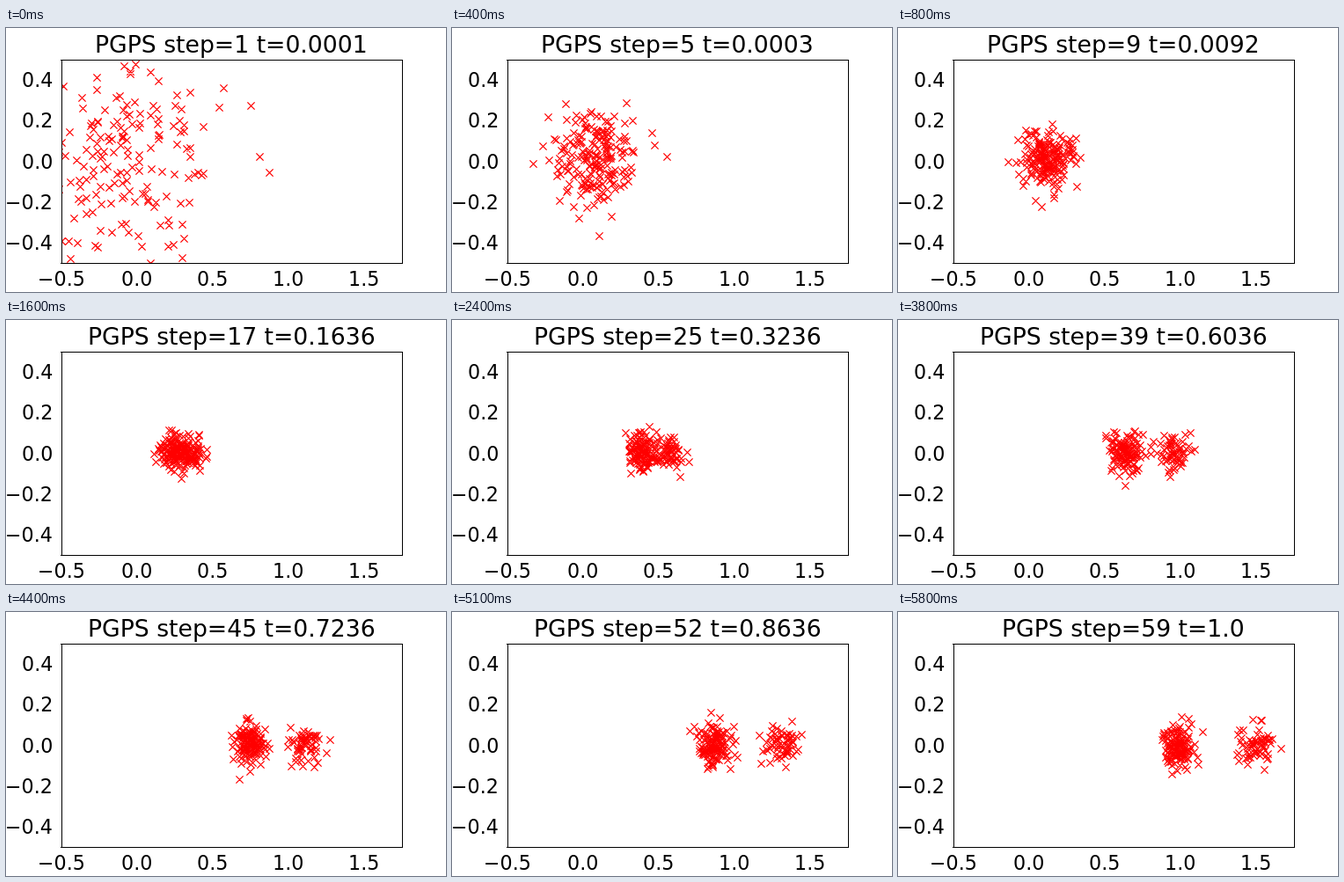
An HTML page for the animation above (5.9 s loop, 500 px wide and 300 px high).

```html
<!DOCTYPE html>
<html lang="en">
<head>
<meta charset="utf-8">
<title>Particle steps</title>
<style>
  html, body { margin: 0; width: 100%; height: 100%; overflow: hidden; background: #fff; }
  svg { display: block; font: 22.22px "DejaVu Sans", sans-serif; }
  #title { font-size: 26.67px; }
</style>
</head>
<body>
<svg width="500" height="300" viewBox="0 0 500 300">
  <clipPath id="axes"><rect x="63" y="36" width="388" height="232"/></clipPath>
  <path id="marks" clip-path="url(#axes)" fill="none" stroke="#f00" stroke-width="1.3"/>
  <path d="M63.5 36V268M450.5 36V268M62 36.5H451M62 267.5H451" stroke="#000"/>
  <text id="title"></text>
</svg>
<script>
const STEPS = 59, STEP_MS = 100, COUNT = 200;
const svg = document.querySelector("svg");
const title = document.getElementById("title");
const marks = document.getElementById("marks");

// Data coordinates to pixels.
const toX = v => 148.6 + v * 172.2;
const toY = v => 151.5 - v * 231;

let seed = 7;
function random() {
  seed = (seed + 0x6d2b79f5) | 0;
  let r = Math.imul(seed ^ (seed >>> 15), seed | 1);
  r ^= r + Math.imul(r ^ (r >>> 7), r | 61);
  return (((r ^ (r >>> 14)) >>> 0) + 0.5) / 4294967296;
}
const normal = () => Math.sqrt(-2 * Math.log(random())) * Math.cos(2 * Math.PI * random());

// The time grows geometrically at first, then evenly.
function timeAt(n) {
  if (n === STEPS) return 1;
  return n < 10 ? 0.0001 + 0.0091 * 2.58 ** (n - 9) : 0.0236 + 0.02 * (n - 10);
}

const cross = (x, y) =>
  `M${Math.floor(x) - 3.6} ${Math.floor(y) - 3.6}l8.2 8.2m0-8.2l-8.2 8.2`;

// A wide cloud contracts, then splits into two groups that drift right.
function drawCloud(n, cloud) {
  const t = timeAt(n);
  const wide = 0.68 ** (n - 1);
  const spreadX = 7 + 3 * t + 6 * Math.exp(-8 * t) + 40 * wide;
  const spreadY = 9 + 3 * t + 5 * Math.exp(-15 * t) + 64 * wide;
  const left = 169 + 151 * t - 30 * wide;
  const right = 172 + 235 * t - 30 * wide;
  return cloud.map(([u, v], i) =>
    cross((i % 3 ? left : right) + spreadX * u, toY(0) + spreadY * v)).join("");
}

// Each particle wanders randomly around its group's centre.
const KEEP = 0.9, KICK = Math.sqrt(1 - KEEP * KEEP);
let cloud = Array.from({ length: COUNT }, () => [normal(), normal()]);
const drawings = [];
for (let n = 1; n <= STEPS; n++) {
  drawings.push(drawCloud(n, cloud));
  cloud = cloud.map(p => p.map(c => c * KEEP + normal() * KICK));
}

// Puts text on whole pixels; align is 0.5 for centred and 1 for right.
function place(el, text, x, y, align) {
  el.textContent = text;
  el.setAttribute("x", Math.round(x - align * el.getComputedTextLength()));
  el.setAttribute("y", Math.floor(y));
}

function label(value, x, y, align) {
  const el = document.createElementNS(svg.namespaceURI, "text");
  svg.append(el);
  place(el, value.toFixed(1).replace("-", "\u2212"), x, y, align);
}
for (let i = 0; i < 5; i++) {
  const v = i * 0.5 - 0.5, w = (i - 2) * 0.2;
  label(v, toX(v), 293, 0.5);
  label(w, 53.2, toY(w) + 8.5, 1);
}

const start = performance.now();
let shown = 0;
function show() {
  const n = Math.floor((performance.now() - start) / STEP_MS) % STEPS + 1;
  if (n !== shown) {
    shown = n;
    const t = n === STEPS ? "1.0" : +timeAt(n).toFixed(4);
    place(title, `PGPS step=${n} t=${t}`, 256, 28, 0.5);
    marks.setAttribute("d", drawings[n - 1]);
  }
  requestAnimationFrame(show);
}
show();
</script>
</body>
</html>
```
